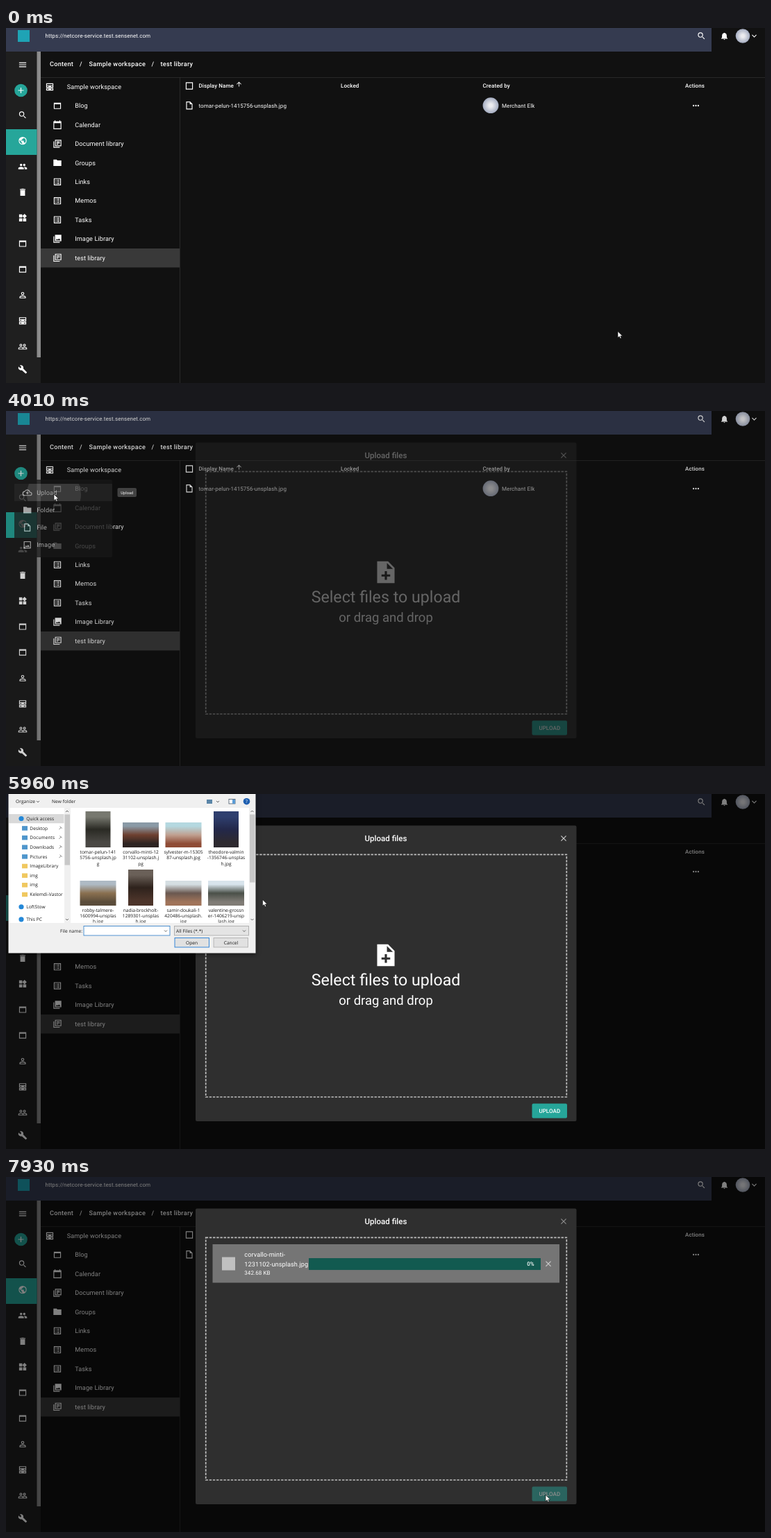
Write an HTML page that moves like this. It is 1093x512 px and loops after 7990 ms.

```html
<!DOCTYPE html>
<html lang="en">
<head>
<meta charset="utf-8">
<title>Upload files</title>
<style>
html, body { margin: 0; width: 100%; height: 100%; overflow: hidden; background: #111; }
svg { display: block; width: 100%; height: 100%; font-family: Roboto, sans-serif; fill: #fff; }
text { white-space: pre; text-rendering: geometricPrecision; }
.body { letter-spacing: .0094em; }
.btn { letter-spacing: .0286em; font-weight: 500; }
.bold { font-weight: 500; }
.mid { text-anchor: middle; }
.win { font-family: "Open Sans", "Noto Sans", sans-serif; fill: #1a1a1a; font-size: 6.6px; }
#files { filter: drop-shadow(0 2px 3px rgba(0,0,0,.5)); }
</style>
</head>
<body>
<svg id="stage" viewBox="0 0 1093 512" preserveAspectRatio="none"></svg>
<script>
const LOOP = 7990;

// Icon parts on a 24 unit grid, filled even-odd
const box = (x, y, w, h) => `M${x} ${y}h${w}v${h}h${-w}z`;
const disc = (x, y, r) => `M${x - r} ${y}a${r} ${r} 0 1 0 ${2 * r} 0a${r} ${r} 0 1 0 ${-2 * r} 0z`;
const frame = (x, y, w, h) => box(x, y, w, h) + box(x + 2, y + 2, w - 4, h - 4);
const ring = (x, y, r) => disc(x, y, r) + disc(x, y, r - 2);
const rows = (ys, part) => ys.map(part).join('');
const stack = 'M2 6h2v14h14v2H2z' + frame(6, 2, 16, 16);
const sheet = 'M4 2h10l6 6v14H4z';
const peaks = 'l-3 4h12l-4-5-3 3.7z';

const ICONS = {
  menu: rows([6, 11, 16], y => box(3, y, 18, 2)),
  add: box(5, 11, 14, 2) + box(11, 5, 2, 6) + box(11, 13, 2, 6),
  search: ring(9.5, 9.5, 6.5) + 'M14 15.5l1.500-1.500 5 5-1.500 1.500z',
  globe: disc(12, 12, 10) + 'M4.200 10.200L9 15v1l2 2v2a8 8 0 0 1-6.800-9.800z' +
    'M15 4.600V5l-2 2h-2v2l-1 1H8v2h6l1 1v3h1l1.900 1.400A8 8 0 0 0 15 4.600z',
  people: disc(8, 8, 3) + disc(16, 8, 3) + 'M8 13q-7 .5-7 3.500V19h14v-2.500q0-3-7-3.500zM16 13h-1q2 1.400 2 3.500V19h6v-2.500q0-3-7-3.500z',
  trash: box(6, 7, 12, 14) + box(5, 4, 14, 2) + box(9, 3, 6, 1),
  widgets: box(3, 3, 8, 8) + box(3, 13, 8, 8) + box(13, 13, 8, 8) + 'M16.700 1.700l5.600 5.600-5.600 5.600L11 7.300z',
  web: box(3, 4, 18, 16) + box(5, 8, 14, 10),
  person: ring(12, 8, 4) + 'M12 13q-8 .5-8 4v3h16v-3q0-3.500-8-4zM12 15q6 .5 6 3H6q0-2.500 6-3z',
  inbox: box(3, 3, 18, 18) + box(5, 5, 14, 3) + box(3, 14, 18, 1) + rows([10, 17], y => box(5, y, 4, 2) + box(15, y, 4, 2)),
  group: ring(7.5, 8.5, 3.5) + ring(16.5, 8.5, 3.5) + 'M7.500 13l4.500 1 4.500-1q6.500.5 6.500 3.300V19H1v-2.700q0-2.800 6.500-3.300z' +
    'M2.500 17.500q0-3 5-3t5 3zM14 17.500v-2.500q7.500-1 7.500 2.500z',
  wrench: 'M22.700 19L13.600 9.900Q15 6 12 3 8.700 0 4.700 1.700L9 6 6 9 1.600 4.700Q0 9 2.900 12.100 6 15 9.800 13.600l9.800 9.100 3.100-2.700z',
  calendar: box(2, 3, 20, 20) + box(4, 8, 16, 13) + box(5, 1, 2, 2) + box(17, 1, 2, 2),
  books: stack + box(10, 6, 8, 2) + box(10, 9, 8, 2) + box(10, 12, 4, 2),
  folder: 'M2 4h8l2 2h10v14H2z',
  list: frame(3, 3, 18, 18) + rows([7, 11, 15], y => box(7, y, 2, 2) + box(11, y, 6, 2)),
  photos: stack.replace(box(8, 4, 12, 12), '') + 'M11 12' + peaks,
  file: sheet + 'M6 4v16h12V9h-5V4z',
  box: frame(3, 3, 18, 18),
  dots: rows([6, 12, 18], x => disc(x, 12, 2)),
  bell: 'M10 20h4l-2 2zM18 16v-5q0-5-4.500-6.300V4h-3v.7Q6 6 6 11v5l-2 2v1h16v-1z',
  down: 'M16.600 8.600L12 13.200 7.400 8.600 6 10l6 6 6-6z',
  up: 'M4 12l1.400 1.400L11 7.800V20h2V7.800l5.600 5.600L20 12l-8-8z',
  close: 'M19 6.400L17.600 5 12 10.600 6.400 5 5 6.400l5.600 5.600L5 17.600 6.400 19l5.600-5.600 5.600 5.600 1.400-1.400-5.600-5.600z',
  note: sheet + 'M13 3.500V9h5.500zM11 11h2v3h3v2h-3v3h-2v-3H8v-2h3z',
  cloud: 'M19.300 10A7.500 7.500 0 0 0 5.300 8 6 6 0 0 0 6 20h13a5 5 0 0 0 .3-10zM19 18H6a4 4 0 0 1 0-8 6 6 0 0 1 11.500 2H19a3 3 0 0 1 0 6zM12 9l-4 4h2.500v3h3v-3H16z',
  image: frame(3, 3, 18, 18) + 'M9 13' + peaks
};

const attrs = (o = {}) => Object.entries(o).map(([k, v]) => ` ${k}="${v}"`).join('');
const rect = (x, y, w, h, fill, o) => `<rect x="${x}" y="${y}" width="${w}" height="${h}" fill="${fill}"${attrs(o)}/>`;
const circle = (x, y, r, fill, o) => `<circle cx="${x}" cy="${y}" r="${r}" fill="${fill}"${attrs(o)}/>`;
const text = (x, y, s, size, cls = 'body') => `<text x="${x}" y="${y}" font-size="${size}" class="${cls}">${s}</text>`;
const icon = (name, x, y, size = 13.7, o) => `<path d="${ICONS[name]}" fill-rule="evenodd" transform="translate(${x - size / 2} ${y - size / 2}) scale(${size / 24})"${attrs(o)}/>`;
const group = (id, inner, o) => `<g id="${id}"${attrs(o)}>${inner}</g>`;
const clip = (id, ...area) => `<clipPath id="${id}">${rect(...area, '#fff')}</clipPath>`;

function page() {
  const side = ['search', 'globe', 'people', 'trash', 'widgets', 'web', 'web', 'person', 'inbox', 'group'];
  const tree = { Blog: 'web', Calendar: 'calendar', 'Document library': 'books', Groups: 'folder', Links: 'list',
    Memos: 'list', Tasks: 'list', 'Image Library': 'photos', 'test library': 'books' };
  const crumbs = [[63, 'Content'], [106, '/'], [119.5, 'Sample workspace'], [209.5, '/'], [222.5, 'test library']];
  const heads = ['Display Name', 'Locked', 'Created by'];
  return rect(0, 0, 1093, 512, '#111') +
    rect(0, 0, 1016, 34, '#353b50') + rect(17, 3, 17, 17, '#1fa3b5') +
    text(56.5, 13.8, 'https://netcore-service.test.sensenet.com', 8) +
    icon('search', 1001.5, 11.5) + icon('bell', 1034.5, 11.5) + circle(1061, 11.5, 10.3, 'url(#face)') + icon('down', 1077.5, 11.5) +
    rect(0, 34, 50, 478, '#1f1f1f') + rect(44.5, 34, 5.5, 441, '#8c8c8c') +
    rect(0, 146, 44.5, 37, '#26a69a') + icon('menu', 24, 53) +
    circle(21.5, 90, 9.3, '#26a69a') + icon('add', 21.5, 90) +
    side.map((n, i) => icon(n, 24, 125.5 + 37.1 * i)).join('') + icon('wrench', 24, 492.5) +
    rect(50, 71, 1043, .7, '#333') + rect(250, 71, .7, 441, '#333') +
    crumbs.map(([x, s]) => text(x, 55.3, s, 9.14, 'btn')).join('') +
    icon('inbox', 63, 85) + text(87.7, 88, 'Sample workspace', 9.14) +
    rect(50, 318, 200, 27.4, '#393939') +
    Object.entries(tree).map(([s, n], i) => icon(n, 74, 112.2 + 27.4 * i) + text(99.2, 115.4 + 27.4 * i, s, 9.14)).join('') +
    icon('box', 264, 83.5) + heads.map((s, i) => text(277.5 + 204.5 * i, 86.3, s, 8, 'body bold')).join('') +
    text(978, 86.3, 'Actions', 8, 'body bold') + icon('up', 335.5, 81, 10.5) +
    icon('file', 264, 111.8) + text(277.5, 114.5, 'tomar-pelun-1415756-unsplash.jpg', 8) +
    circle(698, 111.7, 11.4, 'url(#face)') + text(714, 114.5, 'Merchant Elk', 8) + icon('dots', 993.5, 112);
}

function addMenu() {
  const items = { Upload: 'cloud', Folder: 'folder', File: 'file', Image: 'image' };
  return rect(12, 99, 141, 112, '#1e1e1e', { rx: 2 }) +
    rect(12, 105, 141, 25, '#fff', { id: 'hover', opacity: .08 }) +
    group('wave', circle(69, 120, 0, '#fff', { id: 'ripple', opacity: .2 }), { 'clip-path': 'url(#row)' }) +
    Object.entries(items).map(([s, n], i) => icon(n, 30.7, 117.8 + 25.1 * i) + text(44.3, 120.8 + 25.1 * i, s, 9.14)).join('');
}

// Chosen file; a tall card shows its name in two lines and the progress bar
function card(id, lines, height) {
  const mid = 97 + height / 2;
  return group(id, rect(297.5, 97, 499.5, height, '#757575') + rect(311, mid - 9.2, 19, 19, '#c0c0c0') +
    lines.map((s, i) => text(343.3, 115.3 + 13.7 * i, s, 9.14)).join('') +
    text(343.3, 114 + 13.7 * lines.length, '342.68 KB', 8) +
    (lines.length > 1 ? rect(436, mid - 7.7, 334, 17, '#125a50') + text(755.5, mid + 3.4, '0%', 8, 'bold mid') : '') +
    icon('close', 781, mid + .4, 13.7, { opacity: lines.length > 1 ? .6 : 1 }));
}

function uploadBox() {
  const name = 'corvallo-minti-', rest = '1231102-unsplash.jpg';
  return rect(273, 45.5, 548.5, 426.5, '#2f2f2f', { rx: 2 }) +
    text(547, 67.8, 'Upload files', 11.5, 'bold mid') +
    icon('close', 803, 64, 13.7, { id: 'shut', fill: '#ccc' }) +
    rect(287.7, 87.4, 519.6, 349.6, 'none', { stroke: '#bdbdbd', 'stroke-width': 1.7, 'stroke-dasharray': '3.43 1.74' }) +
    group('empty', icon('note', 547, 232.5, 37.6) +
      text(547, 275.5, 'Select files to upload', 23.2, 'mid') + text(547, 303.7, 'or drag and drop', 18.5, 'mid')) +
    card('ready', [name + rest], 42) + card('sending', [name, rest], 55.5) +
    group('send', rect(757.5, 446.5, 50.5, 21, '#26a69a', { rx: 2 }) + text(782.8, 459.8, 'UPLOAD', 8.1, 'bold mid'));
}

// Soft landscape from sky to ground, standing on a common line per row
function thumb(tones, i) {
  const tall = [0, 3, 5].includes(i), w = tall ? 36 : 52, h = tall ? 52 : 36;
  const stops = tones.split(' ').map((c, j) => `<stop offset="${.15 + .35 * j}" stop-color="${c}"/>`).join('');
  return `<linearGradient id="tone${i}" x2="0" y2="1">${stops}</linearGradient>` +
    rect(132.5 + 61.5 * (i % 4) - w / 2, 77 + 84 * (i >> 2) - h, w, h, `url(#tone${i})`);
}

function fileDialog() {
  const tones = ['#77786f #2a2a24 #4a4844', '#8a9aa6 #6e4030 #2e2422', '#b4d8e0 #c0a090 #8f4c36', '#2f3f6e #23284a #2e2a30',
    '#aebac4 #8a7050 #5a4c3a', '#6a6058 #2e221c #4c342a', '#d5dee2 #6a5850 #a0745a', '#d8e4ec #4a5048 #807c76'];
  const names = ['tomar-pelun-141|5756-unsplash.jp|g', 'corvallo-minti-12|31102-unsplash.j|pg', 'sylvester-m-15305|87-unsplash.jpg',
    'theodore-valmin|-1356746-unsplas|h.jpg', 'robby-talmere-|1600994-unsplas|h.jpg', 'nadia-brockholt-|1289301-unsplas|h.jpg',
    'samir-doukali-1|420486-unsplash.|jpg', 'valentine-grossn|er-1406219-unsp|lash.jpg'];
  const nav = ['Quick access', 'Desktop', 'Documents', 'Downloads', 'Pictures', 'ImageLibrary', 'img', 'img', 'Kelemdi-Vastor', 'LoftStow', 'This PC'];
  const navY = i => 35.5 + 13.65 * i + 4.4 * Math.max(0, i - 8);
  const inner = i => i > 0 && i < 9;
  const navX = i => inner(i) ? 27 : 22;
  const label = (x, y, s, cls) => text(x, y, s, 6.6, cls);
  const line = (d, stroke) => `<path fill="none" stroke="${stroke}" stroke-width=".8" d="${d}"/>`;
  const chevron = (x, y) => line(`M${x} ${y}l2 2 2-2`, '#444');
  const scroller = (x, h) => rect(x, 20, 8.5, 166, '#f0f0f0') + rect(x + .5, 29.5, 7.5, h, '#c8c8c8') +
    line(`M${x + 2} 26l2-2 2 2`, '#444') + chevron(x + 2, 180);
  const field = (x, y, w, fill, stroke) => rect(x, y, w, 13.5, fill, { stroke, 'stroke-width': .9 });
  const captions = names.map((s, i) => s.split('|').map((part, j) =>
    label(132.5 + 61.5 * (i % 4), 86 + 83.7 * (i >> 2) + 8.3 * j, part, 'mid')).join('')).join('');
  return rect(3.5, -20, 356, 249.5, '#f0f0f0') + rect(4, 20, 80, 166, '#fff') + rect(93, 20, 257, 166, '#fff') +
    rect(4, 29, 79.5, 13.2, '#d9d9d9') + scroller(84, 73) + scroller(350.5, 98) +
    group('tree', nav.map((s, i) => label(navX(i) + 7.3, navY(i) + 2.4, s) +
      (inner(i) && i < 5 ? line(`M76.5 ${navY(i) + 2}l3-3m-2-1.500l3 3`, '#666') : '')).join(''), { 'clip-path': 'url(#nav)' }) +
    group('pages', nav.slice(0, 10).map((s, i) => rect(navX(i) - 3, navY(i) - 4, 6, 8, '#fff', { stroke: '#999', 'stroke-width': .7 })).join('')) +
    rect(165, 23.5, 59.5, 82, '#a8d6ff', { id: 'pick' }) +
    group('pictures', tones.map(thumb).join('') + captions, { 'clip-path': 'url(#pane)' }) +
    rect(78, 191, 30, 11, '#fff') + field(112, 190.5, 124, '#fff', '#fff') + field(242.5, 190.5, 107, '#fff', '#fff') +
    field(243, 207.5, 50, '#fff', '#fff') + field(299, 207.5, 50, '#fff', '#fff') +
    rect(321, 7.5, 9, 6.5, '#fff', { stroke: '#456', 'stroke-width': .8 }) + rect(326, 8, 4, 6, '#5b9bd5') +
    circle(346.5, 10.7, 4.8, '#1f5fb0') + `<g fill="#fff">${label(346.5, 13.1, '?', 'mid bold')}</g>` +
    group('late', label(14, 13, 'Organize') + chevron(44, 10) + label(66, 13, 'New folder') +
      rect(289, 8, 8, 6, '#5b86a8') + chevron(303, 10) +
      nav.map((s, i) => inner(i) ? rect(navX(i) - 4, navY(i) - 3, 8, 6.5, i < 5 ? '#4f96cc' : '#f0c860')
        : circle(navX(i), navY(i), 3.6, '#2488d8')).join('') +
      rect(77, 190, 33, 14, '#f0f0f0') + label(78, 199.5, 'File name:') +
      field(112, 190.5, 124, '#fff', '#3a84c8') + chevron(228, 196.5) +
      field(242.5, 190.5, 107, '#e4e4e4', '#aaa') + chevron(341, 196.5) + label(245, 199.6, 'All Files (*.*)') +
      field(243, 207.5, 49.5, '#e1e1e1', '#1f78d0') + label(267.5, 216.6, 'Open', 'mid') +
      field(299, 207.5, 49.5, '#e1e1e1', '#adadad') + label(324, 216.6, 'Cancel', 'mid') +
      group('chosen', label(114, 199.6, 'corvallo-minti-1231102-unsplash.jpg')));
}

document.getElementById('stage').innerHTML =
  `<defs><radialGradient id="face"><stop offset=".2" stop-color="#ececef"/><stop offset="1" stop-color="#a4acc0"/></radialGradient>
  ${clip('row', 12, 105, 141, 25)}${clip('nav', 4, 20, 80, 166)}${clip('pane', 93, 20, 257, 165.5)}</defs>` +
  page() + group('menu', addMenu()) +
  group('tip', rect(160.5, 111, 27.5, 13, '#505050', { rx: 2 }) + text(174.3, 119.6, 'Upload', 5.71, 'bold mid')) +
  rect(0, 0, 1093, 512, '#000', { id: 'shade' }) + group('upload', uploadBox()) +
  group('files', fileDialog(), { class: 'win' }) +
  '<path id="cursor" d="M0 0v9.300l2.200-2 1.400 3.200 1.600-.7-1.400-3.100h3z" stroke="#000" stroke-width=".6"/>';

const ramp = (t, from, to) => Math.min(1, Math.max(0, (t - from) / (to - from)));
const smooth = p => p * p * (3 - 2 * p);
const scaleAt = (x, y, sx, sy = sx) => `translate(${x} ${y}) scale(${sx} ${sy}) translate(${-x} ${-y})`;
const set = (id, name, value) => document.getElementById(id).setAttribute(name, value);
const fade = (id, value) => { set(id, 'opacity', value); set(id, 'display', value > 0 ? 'inline' : 'none'); };
const show = (id, on) => set(id, 'display', on ? 'inline' : 'none');

// Spans in which the picture stands still
const HOLDS = [[1550, 1670], [4010, 4070], [5410, 5500], [6260, 6420], [6420, 6500]];

// Pointer moves: start, end, x, y
const HOME = [881, 437.5];
const MOVES = [[60, 700, 40, 130], [800, 1300, 16, 88], [1670, 2190, 27, 112], [2700, 3340, 69, 120],
  [4310, 4560, 539.5, 189], [5500, 6040, 359, 150], [6070, 6260, 198, 84.5], [6500, 7150, 777, 458.5]];

function draw(now) {
  const hold = HOLDS.find(([a, b]) => now >= a && now < b);
  const t = hold ? hold[0] : now;

  const [x, y] = MOVES.reduce(([px, py], [a, b, nx, ny]) => {
    const p = smooth(ramp(t, a, b));
    return [px + (nx - px) * p, py + (ny - py) * p];
  }, HOME);
  set('cursor', 'transform', `translate(${x} ${y})`);

  const grow = ramp(t, 1505, 1675);
  fade('menu', grow ** 1.5 * (1 - ramp(t, 3960, 4160)));
  set('menu', 'transform', scaleAt(12, 99, .75 + .25 * grow, .5625 + .4375 * grow));
  show('hover', t > 2000);
  set('ripple', 'r', 39 * ramp(t, 3820, 4010));
  fade('tip', ramp(t, 3220, 3340) * (1 - ramp(t, 4070, 4160)));

  const open = ramp(t, 3925, 4160);
  fade('upload', open);
  fade('shade', open * .5);
  show('empty', t < 6420);
  show('ready', t >= 6420 && t < 7760);
  show('sending', t >= 7760);
  const sent = ramp(t, 7760, 7930);
  set('send', 'opacity', 1 - .55 * sent);
  set('shut', 'opacity', 1 - .4 * sent);

  const seen = ramp(t, 5230, 5424) * (1 - ramp(t, 6360, 6560));
  fade('files', seen);
  set('files', 'transform', scaleAt(181.5, 100, 1 - .035 * (1 - seen)));
  show('pages', t < 5500);
  show('late', t >= 5500);
  show('pick', t >= 6260);
  show('chosen', t >= 6260);
}

const start = performance.now();
function tick(now) {
  draw(Math.max(0, now - start) % LOOP);
  requestAnimationFrame(tick);
}
draw(0);
requestAnimationFrame(tick);
</script>
</body>
</html>
```
